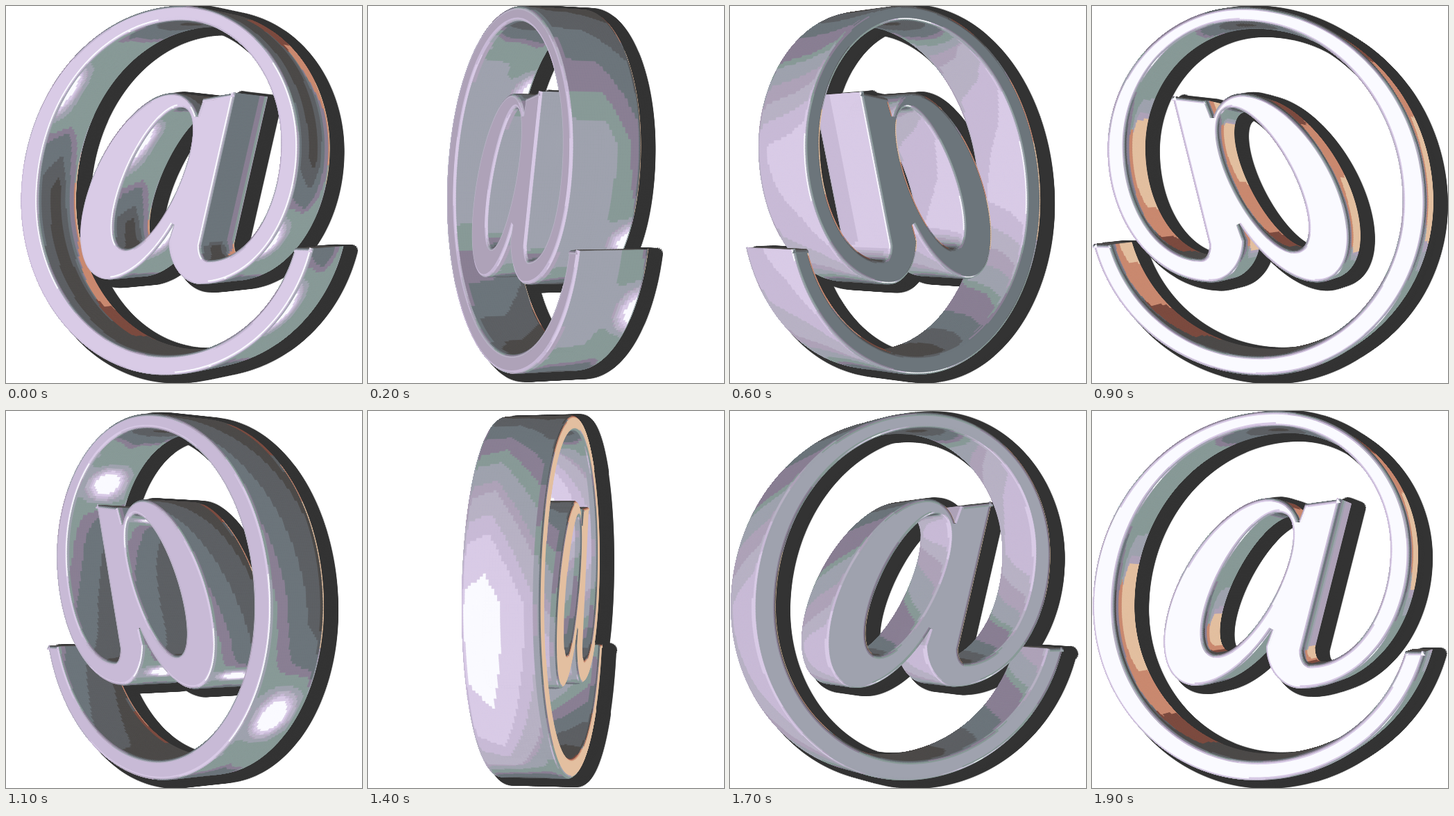
An HTML page with a canvas that plays this animation: 513 by 542 pixels, repeating every 2000 ms.

```html
<!DOCTYPE html>
<html lang="en">
<head>
<meta charset="utf-8">
<title>Spinning at sign</title>
<style>
html, body { margin: 0; width: 100%; height: 100%; overflow: hidden; background: #fff; }
canvas { display: block; }
</style>
</head>
<body>
<canvas id="stage" width="513" height="542"></canvas>
<script>
const W = 513, H = 542, CX = 246.5, CY = 266;
const EYE = 2200, HALF_DEPTH = 52, BEVEL = 5, INSET = 4.5, BULGE = 0.2;
const STEPS = 20, STEP_MS = 100, START_DEG = 30, TURN_DEG = 360 / STEPS;
const RAD = Math.PI / 180;

const rgb = hex => [1, 3, 5].map(i => parseInt(hex.slice(i, i + 2), 16));
const colours = {
  white: '#fafaff', pale: '#d9cbe6', lilac: '#c8bad6', haze: '#b8b2c4', mauve: '#aea2b8',
  silver: '#9fa2ae', teal: '#889a97', plum: '#8a7f93', steel: '#6c757b', slate: '#5d6064',
  soot: '#4d4b49', black: '#333333', peach: '#e3bfa0', copper: '#c98a70', brown: '#7d4c40'
};
for (const name in colours) colours[name] = rgb(colours[name]);
const { white, pale, lilac, mauve, silver, teal, steel, soot, black, peach, copper, brown } = colours;

const clamp = v => Math.max(0, Math.min(1, v));
const mix = (a, b, t) => a.map((v, i) => v + (b[i] - v) * t);
const css = c => `rgb(${c.map(Math.round).join()})`;

// Evenly spaced colour stops.
function ramp(stops, start, gap, v) {
  const at = clamp((v - start) / gap / (stops.length - 1)) * (stops.length - 1);
  const i = Math.min(Math.floor(at), stops.length - 2);
  return mix(stops[i], stops[i + 1], at - i);
}

function snap(c) {
  const gap = p => p.reduce((sum, v, i) => sum + (v - c[i]) ** 2, 0);
  return Object.values(colours).reduce((best, p) => gap(p) < gap(best) ? p : best);
}

// Chrome surroundings: yaw is positive to the left, pitch positive downwards.
const level = yaw => ramp(
  [peach, soot, steel, silver, silver, white, pale, lilac, mauve, steel], -78, TURN_DEG, yaw);

function shade(yaw, pitch) {
  const base = level(yaw > 0 ? yaw * 0.7 : yaw);
  let c;
  if (pitch > 0) {
    const sheen = clamp((pitch - 4) / 24) * clamp((-yaw - 18) / 32);
    c = mix(base, teal, Math.max(sheen, clamp(pitch / 75) ** 2));
    c = mix(c, soot, clamp((pitch - 60) / 30));
    c = mix(c, white, clamp(1.5 * Math.exp(-(((yaw + 42) / 9) ** 2) - ((pitch - 36) / 8) ** 2)));
  } else {
    const dark = mix(base, soot, clamp(-pitch / 80));
    const warm = ramp([soot, brown, copper, base], -75, 20, pitch);
    c = mix(dark, warm, clamp((-yaw - 64) / 6));
  }
  return css(snap(c));
}

// Elliptic arc in degrees, clockwise from the right; lean shears it like italics.
function arc(cx, cy, rx, ry, from, to, lean = 0) {
  const count = Math.ceil(Math.abs(to - from) * RAD * Math.max(rx, ry) / 4);
  return Array.from({ length: count + 1 }, (_, i) => {
    const t = (from + (to - from) * i / count) * RAD;
    return [cx + rx * Math.cos(t) - lean * Math.sin(t), cy + ry * Math.sin(t)];
  });
}

function line(a, b) {
  const count = Math.ceil(Math.hypot(b[0] - a[0], b[1] - a[1]) / 5);
  return Array.from({ length: count + 1 }, (_, i) => [0, 1].map(j => a[j] + (b[j] - a[j]) * i / count));
}

// Chains pieces into one smooth run, dropping doubled points.
const join = (...parts) => parts.flat().filter(([x, y], i, all) =>
  i === 0 || Math.hypot(x - all[i - 1][0], y - all[i - 1][1]) > 0.5);

// Adds the outward normal to every point of a run.
function withNormals(points, closed) {
  const last = points.length - 1;
  return points.map(([x, y], i) => {
    const p = points[i > 0 ? i - 1 : closed ? last - 1 : 0];
    const q = points[i < last ? i + 1 : closed ? 1 : last];
    const len = Math.hypot(q[0] - p[0], q[1] - p[1]);
    return { x, y, nx: (q[1] - p[1]) / len, ny: (p[0] - q[0]) / len };
  });
}

const first = run => run[0], last = run => run[run.length - 1];

const bowl = arc(-34, -5, 85, 132, 23, 311, 53);
const ringOuter = join(
  arc(-5, 15, 252, 244, 14.7, 90),
  arc(-5, 15, 235, 244, 90, 180),
  arc(24, 15, 264, 274, 180, 270),
  arc(24, -60, 194, 199, 270, 360),
  arc(64, -60, 154, 189, 0, 90),
  arc(64, 70, 49, 59, 90, 180),
  line([15, 70], first(bowl)));
const stemLeft = [71, -128], stemRight = [121, -134];
const ringInner = join(
  line(stemRight, [67, 76]),
  arc(78, 76, 11, 20, 180, 90),
  arc(78, -65, 113, 161, 90, 0),
  arc(26, -65, 165, 174, 360, 270),
  arc(26, 15, 234, 254, 270, 180),
  arc(-1, 15, 207, 217, 180, 90),
  arc(-1, 15, 222, 217, 90, 16.6));
const outer = [
  ringOuter, bowl, line(last(bowl), stemLeft), line(stemLeft, stemRight),
  ringInner, line(last(ringInner), first(ringOuter))
].map(run => withNormals(run, false));
const hole = withNormals(arc(-11, -17, 47, 100, 360, 0, 45), true);

const segments = [];
for (const run of [...outer, hole])
  for (let i = 1; i < run.length; i++) segments.push([run[i - 1], run[i]]);

// Cross-section of the rim: rounded bevels and a slightly bulging wall.
const profile = [];
const WALL_Z = HALF_DEPTH - BEVEL;
for (let t = -1; t <= 1; t += 1 / 12)
  profile.push({ inset: 0, z: WALL_Z * t, tilt: Math.atan(BULGE * t) });
for (let i = 1; i <= 4; i++) {
  const tilt = i * Math.PI / 8;
  const inset = INSET * (1 - Math.cos(tilt)), z = WALL_Z + BEVEL * Math.sin(tilt);
  profile.push({ inset, z, tilt });
  profile.unshift({ inset, z: -z, tilt: -tilt });
}

const stage = document.getElementById('stage').getContext('2d');
const buffer = document.createElement('canvas');
buffer.width = W;
buffer.height = H;
const ink = buffer.getContext('2d');

function trace(points) {
  points.forEach(([x, y], i) => i ? ink.lineTo(x, y) : ink.moveTo(x, y));
  ink.closePath();
}

function drawSign(theta) {
  const s = Math.sin(theta), c = Math.cos(theta);
  const project = (p, ring) => {
    const x = p.x - p.nx * ring.inset, y = p.y - p.ny * ring.inset;
    const f = EYE / (EYE - x * s - ring.z * c);
    return [CX + (x * c - ring.z * s) * f, CY + y * f];
  };
  ink.clearRect(0, 0, W, H);
  ink.lineWidth = 0.8;

  // Far walls first.
  const distance = ([a, b]) => Math.hypot((a.x + b.x) / 2 - EYE * s, (a.y + b.y) / 2);
  const sorted = segments.map(pair => ({ pair, d: distance(pair) })).sort((m, n) => n.d - m.d);
  for (const { pair: [a, b] } of sorted) {
    const nx = (a.nx + b.nx) / 2, ny = (a.ny + b.ny) / 2;
    for (let i = 1; i < profile.length; i++) {
      const low = profile[i - 1], high = profile[i];
      const quad = [project(a, low), project(b, low), project(b, high), project(a, high)];
      const [p, q, r, t] = quad;
      if ((r[0] - p[0]) * (t[1] - q[1]) - (r[1] - p[1]) * (t[0] - q[0]) <= 0) continue;
      const tilt = (low.tilt + high.tilt) / 2;
      const flat = Math.cos(tilt), nz = Math.sin(tilt);
      const yaw = Math.atan2(nz * s - nx * flat * c, nx * flat * s + nz * c) / RAD;
      const pitch = Math.asin(Math.max(-1, Math.min(1, ny * flat))) / RAD;
      ink.fillStyle = ink.strokeStyle = shade(yaw, pitch);
      ink.beginPath();
      trace(quad);
      ink.fill();
      ink.stroke();
    }
  }

  const front = c > 0;
  const face = front ? last(profile) : first(profile);
  ink.fillStyle = css(level(Math.atan2(front ? s : -s, Math.abs(c)) / RAD));
  ink.beginPath();
  trace(outer.flat().map(p => project(p, face)));
  trace(hole.map(p => project(p, face)));
  ink.fill('evenodd');
}

function drawStage(step) {
  drawSign((START_DEG + step * TURN_DEG) * RAD);
  stage.fillStyle = '#fff';
  stage.fillRect(0, 0, W, H);
  // A hard shadow, grown by a few pixels.
  stage.shadowColor = css(black);
  for (let angle = 0; angle < 2 * Math.PI; angle += Math.PI / 8) {
    stage.shadowOffsetX = 14 + 7 * Math.cos(angle);
    stage.shadowOffsetY = 5 + 7 * Math.sin(angle);
    stage.drawImage(buffer, 0, 0);
  }
  stage.shadowColor = 'transparent';
  stage.drawImage(buffer, 0, 0);
}

let shown = -1;
const begin = performance.now();
function tick() {
  const step = Math.floor((performance.now() - begin) / STEP_MS) % STEPS;
  if (step !== shown) drawStage(shown = step);
  requestAnimationFrame(tick);
}
tick();
</script>
</body>
</html>
```
